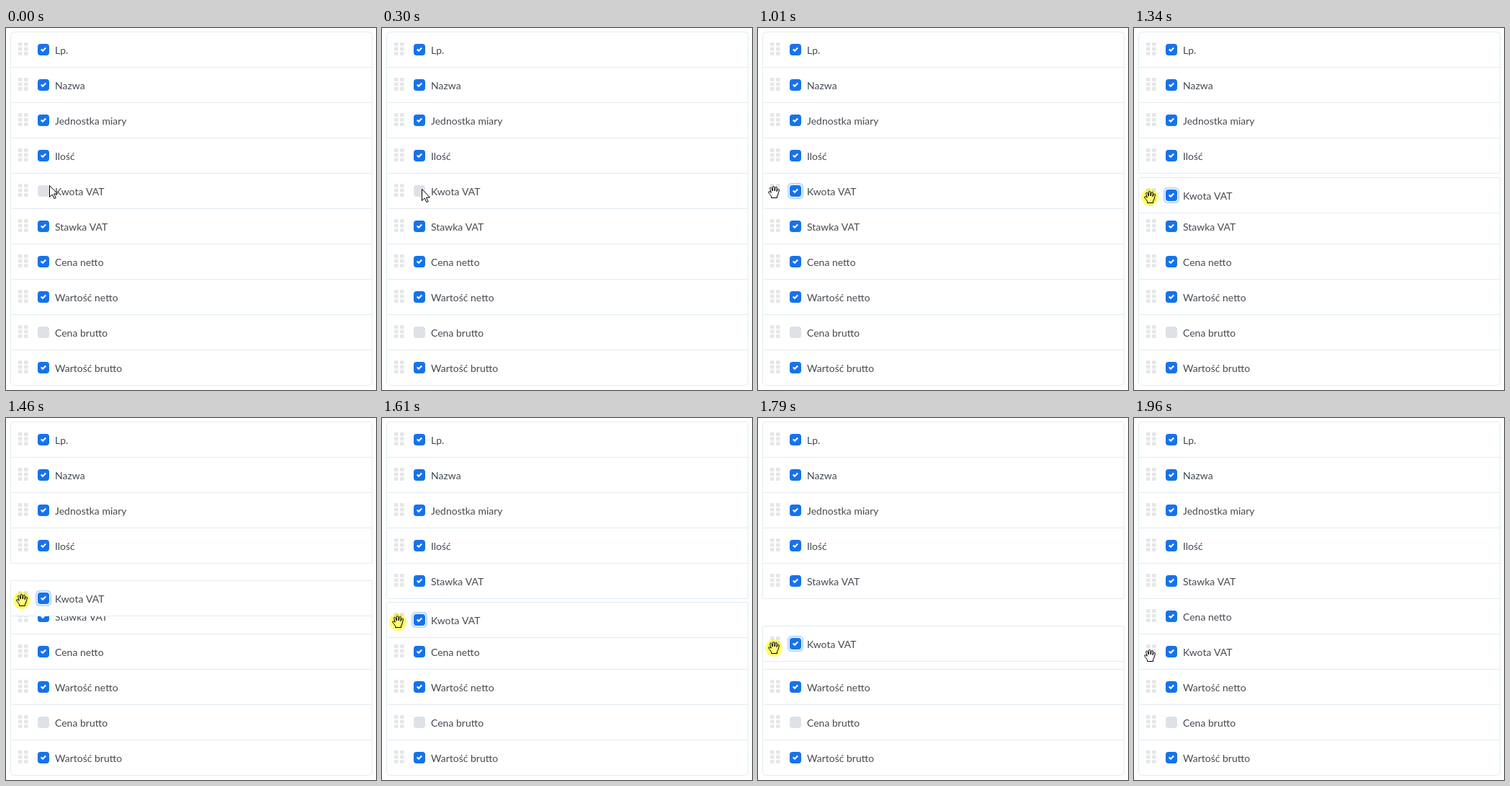
An HTML page with a canvas that plays this animation: 514 px wide and 502 px high, repeating every 2.46 s.

```html
<!DOCTYPE html>
<html lang="pl">
<head>
<meta charset="utf-8">
<title>Kolumny</title>
<style>
html, body { margin: 0; width: 100%; height: 100%; overflow: hidden; background: #fff; }
canvas { display: block; }
</style>
</head>
<body>
<canvas id="stage" width="514" height="502"></canvas>
<script>
const ctx = document.getElementById('stage').getContext('2d');
const LOOP = 2460, TOP = 5, ROW = 49, LEFT = 6, WIDTH = 502;
const PRESS = 550, CHECK = 620, GRAB = 1250, DROP = 1960, STEP = 30;

const names = ['Lp.', 'Nazwa', 'Jednostka miary', 'Ilość', 'Kwota VAT',
  'Stawka VAT', 'Cena netto', 'Wartość netto', 'Cena brutto', 'Wartość brutto'];
const MOVED = 4, UNCHECKED = 8;

const tick = new Path2D('M6.564.75l-3.59 3.612-1.538-1.55L0 4.26 2.974 7.25 8 2.193z');
const arrow = new Path2D('M.5 .5V16.5L4.2 13L7 18.6L9.2 17.6L6.6 12H11.6Z');
const hand = new Path2D('M4.5 16.5V14.5L2.5 11.5L.7 9.2Q.3 7.6 1.8 7.6Q2.8 7.7 4 9.3L4.3 9' +
  'L2.8 4.3Q2.3 2.4 3.6 2.2Q4.8 2.1 5.2 3.6L6.2 7H6.4L6.3 2Q6.4 .5 7.6 .5Q8.8 .5 8.9 2' +
  'L9.1 7H9.3L10 2.6Q10.3 1.3 11.3 1.4Q12.5 1.6 12.3 3L11.8 7.5H12.2L13.2 5' +
  'Q13.8 3.9 14.7 4.3Q15.7 4.8 15.3 6L14.2 10Q13.9 12 12.5 14V16.5Z');

// time, x, y: the pointer jumps between these
const hops = [[0, 60, 218], [250, 58, 220], [280, 55, 223], [310, 53, 225], [340, 52, 226],
  [670, 46, 228], [700, 38, 230], [780, 33, 230], [810, 25, 229], [840, 23, 228], [1010, 22, 228]];
// time, y: interpolated while dragging
const pointerKeys = [[1250, 228], [1310, 231], [1460, 253], [1610, 283], [1760, 312],
  [1790, 319], [1820, 325], [1850, 329], [1880, 330]];
const rowKeys = [[1250, 201], [1310, 203], [1460, 225], [1610, 255], [1760, 280],
  [1790, 288], [1820, 296], [1850, 303]];

function track(keys, t) {
  const i = keys.findIndex(k => k[0] > t);
  if (i < 0) return keys[keys.length - 1][1];
  if (i === 0) return keys[0][1];
  const [t0, a] = keys[i - 1], [t1, b] = keys[i];
  return Math.round(a + (b - a) * (t - t0) / (t1 - t0));
}

function box(x, y, w, h, r, color) {
  ctx.fillStyle = color;
  ctx.beginPath();
  ctx.roundRect(x, y, w, h, r);
  ctx.fill();
}

function checkbox(x, y, on, focus) {
  if (focus) {
    box(x - 3.2, y - 3.2, 22.4, 22.4, 6, '#c3dcfa');
    box(x - 1, y - 1, 18, 18, 4.5, '#fff');
  }
  box(x, y, 16, 16, 4, on ? '#1672ec' : '#dee2e6');
  if (!on) return;
  ctx.save();
  ctx.translate(x + 4, y + 4);
  ctx.fillStyle = '#fff';
  ctx.fill(tick);
  ctx.restore();
}

function row(id, y, corners, on, focus) {
  box(LEFT, y, WIDTH + 1, ROW + 1, corners, '#fff');
  ctx.strokeStyle = '#e0ebf3';
  ctx.lineWidth = 1;
  ctx.beginPath();
  ctx.roundRect(LEFT + .5, y + .5, WIDTH, ROW, corners);
  ctx.stroke();
  for (let i = 0; i < 6; i++) {
    box(17 + i % 2 * 8, y + 15 + (i >> 1) * 6.5, 5.5, 5, 1, '#e5e6e7');
  }
  checkbox(44, y + 17, on, focus);
  ctx.fillStyle = '#454b52';
  ctx.fillText(names[id], 68, y + 31);
}

function cursor(shape, x, y) {
  ctx.save();
  ctx.translate(x, y);
  ctx.fillStyle = '#fff';
  ctx.strokeStyle = '#000';
  ctx.lineWidth = 1;
  ctx.lineJoin = 'round';
  ctx.fill(shape);
  ctx.stroke(shape);
  ctx.restore();
}

function highlight(x, y) {
  ctx.save();
  ctx.globalCompositeOperation = 'multiply';
  ctx.fillStyle = '#ffff70';
  ctx.beginPath();
  ctx.arc(x, y, 12, 0, Math.PI * 2);
  ctx.fill();
  ctx.restore();
}

function draw(t) {
  const dragging = t >= GRAB && t < DROP;
  const snapped = GRAB + Math.floor((t - GRAB) / STEP) * STEP;
  let [, x, y] = hops.filter(h => h[0] <= t).pop();
  if (t >= GRAB) y = track(pointerKeys, snapped);

  // the moved row trades places once the pointer passes a neighbour's middle
  const slot = MOVED + (y > 275) + (y > 324);
  const order = names.map((_, i) => i).filter(i => i !== MOVED);
  order.splice(slot, 0, MOVED);

  ctx.fillStyle = '#fff';
  ctx.fillRect(0, 0, 514, 502);
  ctx.font = '14px Lato, sans-serif';
  ctx.textBaseline = 'alphabetic';

  const isOn = id => id === MOVED ? t >= CHECK : id !== UNCHECKED;
  const focus = t >= CHECK && t < DROP;
  order.forEach((id, i) => {
    if (id === MOVED && dragging) return;
    const corners = i === 0 ? [4, 4, 0, 0] : i === 9 ? [0, 0, 4, 4] : 0;
    row(id, TOP + i * ROW, corners, isOn(id), id === MOVED && focus);
  });
  if (dragging) row(MOVED, track(rowKeys, snapped), 0, true, true);

  if (x < 31) cursor(hand, x - 8, y - 9);
  else cursor(arrow, x, y);
  if (dragging || (t >= PRESS && t < CHECK)) highlight(x, y);
}

const start = performance.now();
function frame() {
  draw((performance.now() - start) % LOOP);
  requestAnimationFrame(frame);
}
frame();
</script>
</body>
</html>
```
